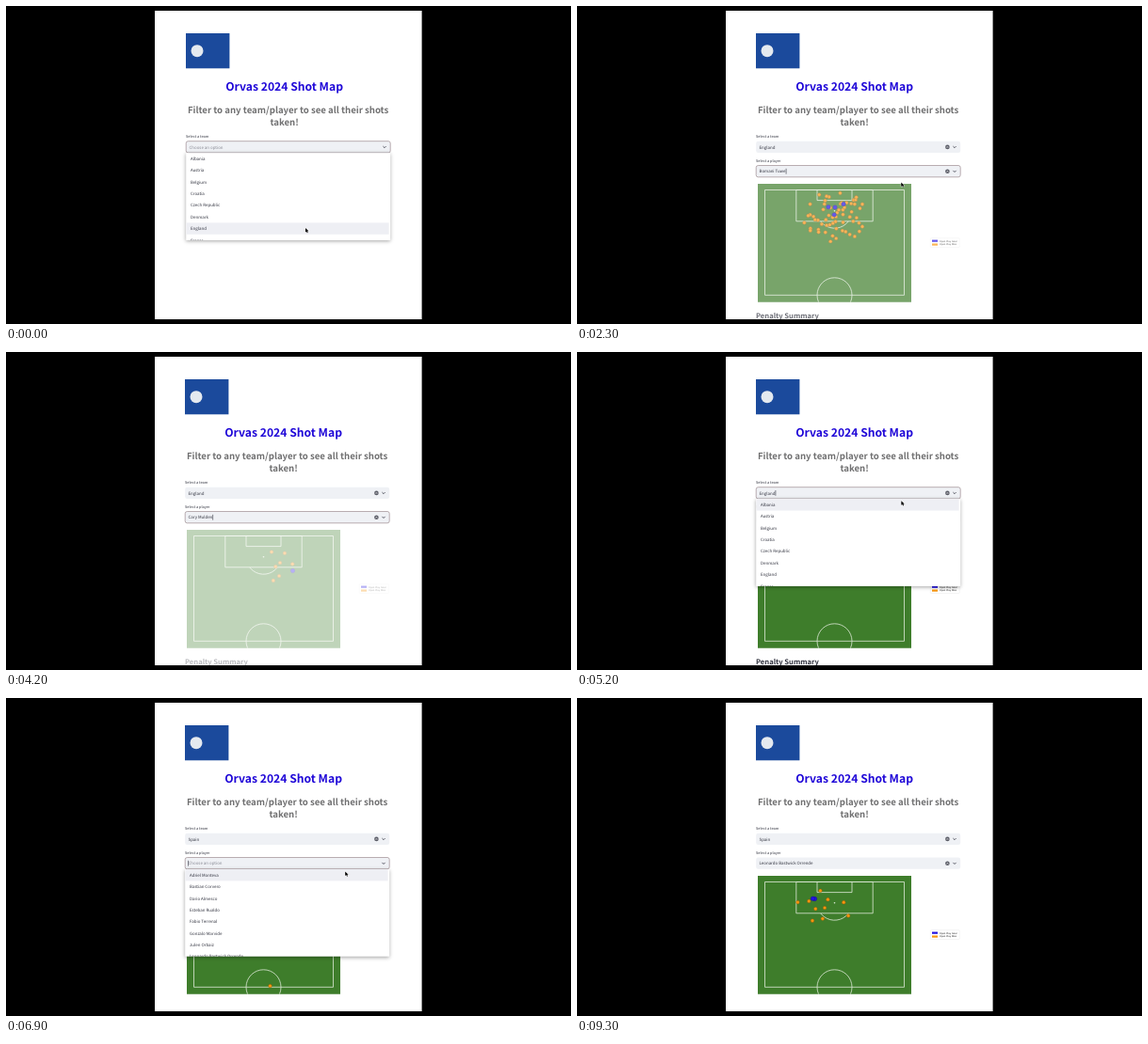
An HTML page with a canvas for the animation above (9400 ms loop, 600 px wide and 338 px high).

```html
<!DOCTYPE html>
<html lang="en">
<head>
<meta charset="utf-8">
<title>Shot Map</title>
<style>
  html, body { margin: 0; width: 100%; height: 100%; overflow: hidden; background: #000; }
  canvas { display: block; width: 600px; height: 338px; }
</style>
</head>
<body>
<canvas id="stage"></canvas>
<script>
const LOOP = 9400, STEP = 100, ROW = 12.36, MENU_H = ROW * 7.5;
const SANS = '"Noto Sans CJK JP", "Noto Sans CJK SC", "Noto Sans CJK", "Open Sans", sans-serif';
const INK = '#31333f', ORANGE = '#f7960f', BLUE = '#2312e2', PURPLE = '#8b6f7c';

const canvas = document.getElementById('stage');
const ctx = canvas.getContext('2d');
const ratio = window.devicePixelRatio || 1;
canvas.width = 600 * ratio;
canvas.height = 338 * ratio;

const TEAMS = ['Albania', 'Austria', 'Belgium', 'Croatia', 'Czech Republic', 'Denmark', 'England',
  'France', 'Georgia', 'Germany', 'Hungary', 'Italy', 'Netherlands', 'Poland', 'Portugal', 'Romania',
  'Scotland', 'Serbia', 'Slovakia', 'Slovenia', 'Spain', 'Switzerland', 'Turkey', 'Ukraine'];
const PLAYERS = {
  England: ['Bomani Tuwe', 'Cary Mulden', 'Dorian Hask', 'Ekundayo Oru', 'Hugo Trask',
    'Ivor Nelby', 'Joss Marwen', 'Juno Haddersley'],
  Spain: ['Adriel Monteva', 'Bastian Corvero', 'Dario Almesco', 'Esteban Rualdo', 'Fabio Terrenal',
    'Gonzalo Marvide', 'Julen Orbaiz', 'Leonardo Bastwick Orrende', 'Mateo Sorvilla', 'Nestor Palgado',
    'Oriol Benvare', 'Rufino Castrel', 'Tomeu Valdrec']
};

// Seeded shots on a loose spiral, denser towards the centre
function cloud(count, cx, cy, rx, ry, seed = count) {
  const rand = () => (seed = (seed * 16807) % 2147483647) / 2147483647;
  return Array.from({ length: count }, (_, i) => {
    const r = ((i + rand()) / count) ** 0.6, angle = i * 2.4 + rand();
    return [cx + rx * r * Math.cos(angle), cy + ry * r * Math.sin(angle)];
  });
}

const PLOTS = {
  england: { misses: cloud(60, 275, 224, 36, 27), goals: cloud(4, 274, 214, 16, 9) },
  forward: { misses: cloud(7, 291, 224, 15, 22), goals: cloud(1, 304.5, 232.5, 0, 0) },
  reserve: { misses: cloud(2, 297, 225.5, 5, 2), goals: cloud(1, 290, 236, 0, 0) },
  spain: {
    misses: [...cloud(105, 274, 226, 38, 31), [280.5, 306]],
    goals: cloud(13, 274, 221, 24, 18),
    freeKick: true
  },
  winger: { misses: cloud(10, 263, 223, 30, 22), goals: cloud(2, 252.5, 213.5, 2.5, 2) }
};

// Each step changes part of the state; `at` is where the pointer has arrived
const SCRIPT = [
  { t: 0, team: '', player: '', focus: 'team', menu: 'team', plot: '', stale: null, pointer: true, at: [318, 236] },
  { t: 700, team: 'England', menu: '', at: [318, 237] },
  { t: 1100, plot: 'england' },
  { t: 1400, focus: 'player', menu: 'player', at: [372, 178] },
  { t: 1600, at: [374, 207] },
  { t: 2100, player: PLAYERS.England[0], menu: '', stale: 2100, at: [345, 188] },
  { t: 2500, plot: 'forward', stale: null },
  { t: 3300, menu: 'player', at: [335, 180] },
  { t: 3800, player: PLAYERS.England[1], menu: '', stale: 3800, pointer: false, at: [330, 200] },
  { t: 4400, plot: 'reserve', stale: null },
  { t: 4600, pointer: true },
  { t: 5000, focus: 'team', menu: 'team', at: [345, 150] },
  { t: 5900, team: 'Spain', player: '', menu: '', stale: 5900, at: [340, 215] },
  { t: 6200, at: [363, 176] },
  { t: 6400, plot: 'spain', stale: null },
  { t: 6600, focus: 'player', menu: 'player', at: [363, 176] },
  { t: 7600, player: PLAYERS.Spain[7], menu: '', stale: 7600, pointer: false, at: [350, 215] },
  { t: 8200, plot: 'winger', stale: null },
  { t: 8800, focus: '' }
];
const MOVES = SCRIPT.filter(step => step.at);

const ramp = (t, from, to) => Math.max(0, Math.min(1, (t - from) / (to - from)));
const smooth = k => k * k * (3 - 2 * k);
const stateAt = t => Object.assign({}, ...SCRIPT.filter(step => step.t <= t));

function pointerAt(t) {
  const next = MOVES.find(step => step.t > t) || MOVES[MOVES.length - 1];
  const last = MOVES.filter(step => step.t <= t).pop();
  const k = smooth(ramp(t, last.t, next.t));
  return last.at.map((v, i) => v + (next.at[i] - v) * k);
}

function text(str, x, y, size, color, weight = 500, align = 'left', family = SANS) {
  ctx.font = `${weight} ${size}px ${family}`;
  ctx.fillStyle = color;
  ctx.textAlign = align;
  ctx.fillText(str, x, y);
  return ctx.measureText(str).width;
}

function box(x, y, w, h, fill) {
  ctx.fillStyle = fill;
  ctx.fillRect(x, y, w, h);
}

function stroke(color, width) {
  ctx.strokeStyle = color;
  ctx.lineWidth = width;
  ctx.stroke();
}

function dot(x, y, r, fill, edge) {
  ctx.beginPath();
  ctx.arc(x, y, r, 0, Math.PI * 2);
  ctx.fillStyle = fill;
  ctx.fill();
  if (edge) stroke(edge, 0.4);
}

function line(color, width, ...points) {
  ctx.beginPath();
  points.forEach(([x, y]) => ctx.lineTo(x, y));
  stroke(color, width);
}

function clipped(x, y, w, h, paint) {
  ctx.save();
  ctx.beginPath();
  ctx.rect(x, y, w, h);
  ctx.clip();
  paint();
  ctx.restore();
}

function header() {
  box(190, 29, 46.4, 37.3, '#1b4a9c');
  dot(202, 47.7, 6.5, '#e4e9ef');
  text('Orvas 2024 Shot Map', 294.6, 90, 12.15, '#2008d8', 700, 'center');
  text('Filter to any team/player to see all their shots', 298.6, 113.8, 9.6, '#707071', 700, 'center');
  text('taken!', 294.6, 127, 9.6, '#707071', 700, 'center');
}

function select(label, y, value, focused, caret) {
  const mid = y + 6.2;
  text(label, 190, y - 3.6, 3.88, INK);
  ctx.beginPath();
  ctx.roundRect(190.2, y, 217, 12.3, 2.2);
  ctx.fillStyle = '#eff1f5';
  ctx.fill();
  if (focused) stroke('#978489', 0.65);
  const width = text(value || 'Choose an option', 193.5, mid + 1.6, 4.43, value ? INK : '#868892');
  if (focused && caret) box(193.3 + (value ? width + 0.4 : -0.3), mid - 2.9, 0.6, 5.8, INK);
  if (value) {
    dot(393.4, mid, 2.3, '#5d5f69');
    line('#fff', 0.5, [392.6, mid - 0.8], [394.2, mid + 0.8]);
    line('#fff', 0.5, [394.2, mid - 0.8], [392.6, mid + 0.8]);
  }
  line(INK, 0.8, [399.4, mid - 0.8], [401, mid + 0.8], [402.6, mid - 0.8]);
}

function menu(y, items, scroll, hover) {
  ctx.save();
  ctx.shadowColor = 'rgba(0,0,0,.35)';
  ctx.shadowBlur = 4 * ratio;
  ctx.shadowOffsetY = ratio;
  box(190.2, y, 217, MENU_H, '#fff');
  ctx.restore();
  clipped(190.2, y, 217, MENU_H, () => items.forEach((name, i) => {
    const top = y + i * ROW - scroll;
    if (i === hover) box(190.4, top, 215.2, ROW, '#eeeff4');
    text(name, 195, top + 7.8, 4.43, INK);
  }));
}

function openMenu(t, { menu: kind, team, player }, [, py]) {
  const isTeam = kind === 'team';
  const y = isTeam ? 156.2 : 182;
  const items = isTeam ? TEAMS : PLAYERS[team];
  const scroll = isTeam ? 195 * smooth(ramp(t, 5200, 5700)) : 60 * smooth(ramp(t, 6900, 7400));
  const inside = py >= y && py < y + MENU_H;
  const hover = inside ? Math.floor((py - y + scroll) / ROW) : items.indexOf(isTeam ? team : player);
  menu(y, items, scroll, hover);
}

function pitch() {
  const mid = 273.5, top = 195.5, half = 307.3, unit = 1.85, white = '#dfead9';
  const area = (width, depth) => ctx.rect(mid - width * unit / 2, top, width * unit, depth * unit);
  clipped(192, 189, 163, 125.8, () => {
    box(192, 189, 163, 126, '#3e7d2b');
    ctx.beginPath();
    ctx.rect(mid - 40 * unit, top, 80 * unit, half - top);
    area(44, 18);
    area(20, 6);
    stroke(white, 0.8);
    ctx.beginPath();
    ctx.arc(mid, half, 10 * unit, 0, Math.PI * 2);
    stroke(white, 0.8);
    ctx.beginPath();
    ctx.arc(mid, top + 12 * unit, 10 * unit, 0.65, Math.PI - 0.65);
    stroke(white, 0.8);
    dot(mid, top + 12 * unit, 0.8, white);
  });
}

function legend(freeKick) {
  const rows = [['Open Play Goal', BLUE], ['Open Play Miss', ORANGE]];
  if (freeKick) rows.push(['Free Kick Miss', PURPLE]);
  const top = 251.6 - rows.length * 1.95;
  ctx.beginPath();
  ctx.roundRect(375.3, top - 1, 31, rows.length * 3.9 + 2, 0.8);
  stroke('#e4e4e4', 0.4);
  rows.forEach(([name, color], i) => {
    const y = top + 1.95 + i * 3.9;
    box(377, y - 1.1, 6, 2.2, color);
    text(name, 385, y + 0.9, 2.4, '#111', 400, 'left', '"DejaVu Sans", sans-serif');
  });
}

function results(t, { plot, stale, team }) {
  const { misses, goals, freeKick } = PLOTS[plot];
  pitch();
  misses.forEach(([x, y]) => dot(x, y, 1.85, ORANGE, '#8a5208'));
  goals.forEach(([x, y]) => dot(x, y, 2.2, BLUE, '#150a80'));
  legend(freeKick);
  if (team === 'England' || stale === 5900) text('Penalty Summary', 190, 331.8, 7.6, INK, 700);
  if (stale !== null) {
    const veil = 0.67 * ramp(t, stale, stale + 300) ** 2;
    box(186, 186, 250, 147, `rgba(255,255,255,${veil})`);
  }
}

function pointer([x, y]) {
  ctx.beginPath();
  [[0, 0], [0, 4.6], [1.1, 3.7], [1.9, 5.3], [2.7, 4.9], [2, 3.4], [3.4, 3.3]]
    .forEach(([dx, dy]) => ctx.lineTo(x + dx, y + dy));
  ctx.closePath();
  stroke('#fff', 0.8);
  ctx.fillStyle = '#000';
  ctx.fill();
}

function draw(t) {
  const state = stateAt(t), spot = pointerAt(t);
  ctx.setTransform(ratio, 0, 0, ratio, 0, 0);
  ctx.textRendering = 'geometricPrecision';
  box(0, 0, 600, 338, '#000');
  clipped(158, 5, 283.6, 328, () => {
    box(158, 5, 284, 328, '#fff');
    ctx.save();
    // The page sits slightly further right until its scrollbar appears
    if (!state.plot) ctx.translate(1, 0);
    header();
    select('Select a team', 143.7, state.team, state.focus === 'team', t >= 700);
    if (state.plot) {
      select('Select a player', 169.5, state.player, state.focus === 'player', true);
      results(t, state);
    }
    if (state.menu) openMenu(t, state, spot);
    ctx.restore();
    if (state.pointer) pointer(spot);
  });
}

const start = performance.now();
function tick(now) {
  const elapsed = Math.max(0, now - start) % LOOP;
  draw(Math.floor(elapsed / STEP) * STEP);
  requestAnimationFrame(tick);
}
draw(0);
requestAnimationFrame(tick);
</script>
</body>
</html>
```
